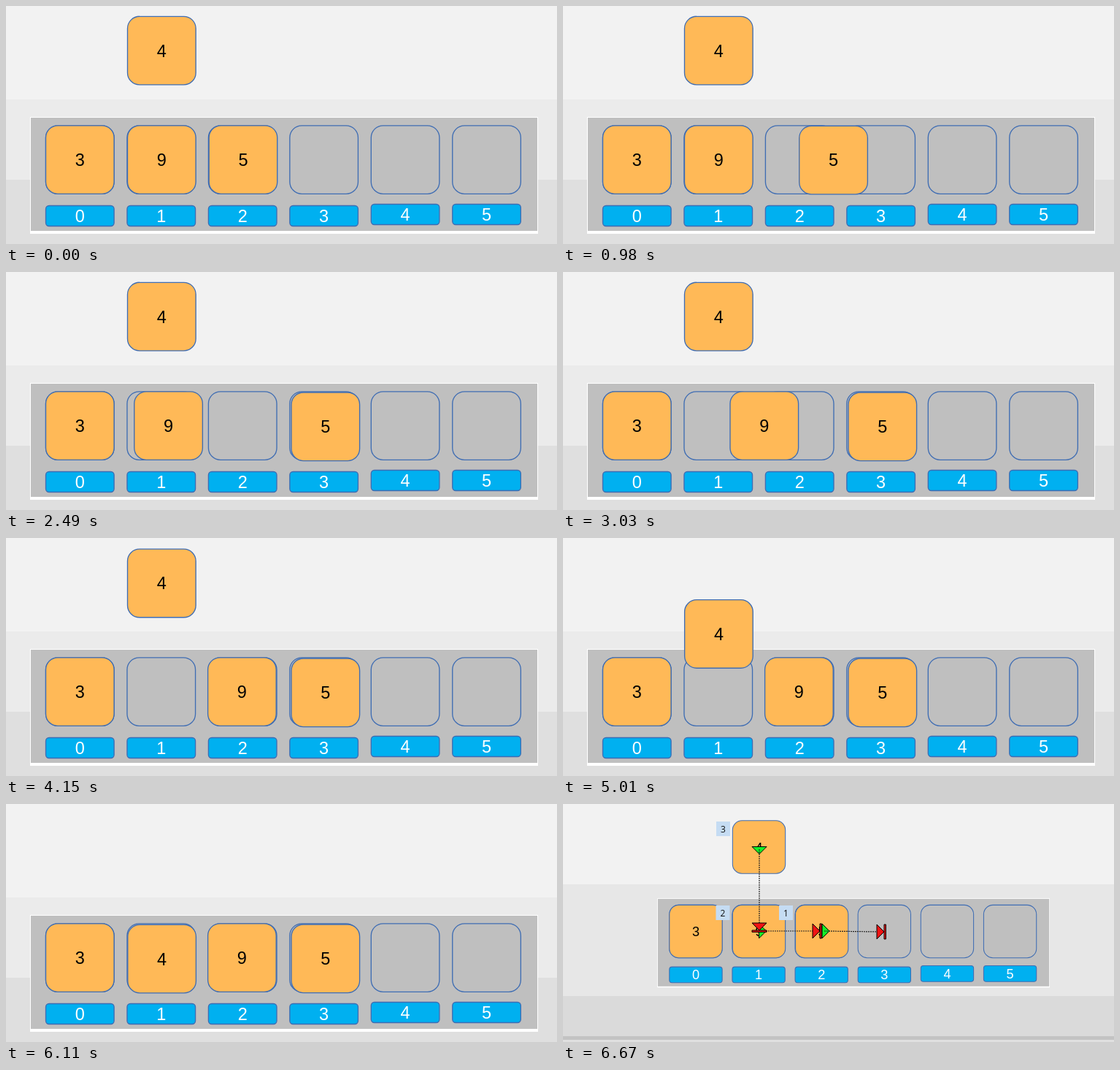
Animation, 755 px wide and 326 px high, one loop 6.77 s. Source, as an HTML page with a canvas:

```html
<!DOCTYPE html>
<html lang="en">
<head>
<meta charset="utf-8">
<title>Array insertion</title>
<style>
html, body { margin: 0; height: 100%; overflow: hidden; background: #f2f2f2; }
canvas { display: block; }
</style>
</head>
<body>
<canvas id="stage" width="755" height="326"></canvas>
<script>
const ctx = document.getElementById('stage').getContext('2d');
const LOOP = 6770, EDITOR_START = 6670, MOVE = 2000;
const SIZE = 93.6, PITCH = 111.45, LEFT = 54.5, TOP = 163.8;
const ORANGE = '#ffb957', BLUE = '#3f6db3';
const DIGITS = '23.5px "Liberation Sans", Arial, sans-serif';

const slotX = i => LEFT + PITCH * i;

// Each tile moves once, with constant acceleration and then deceleration.
const tiles = [
  { digit: 3, from: [slotX(0), TOP], to: [slotX(0), TOP], start: 0 },
  { digit: 9, from: [166.5, TOP], to: [276.6, TOP], start: 1960 },
  { digit: 5, from: [278, TOP], to: [391, 165], start: -50 },
  { digit: 4, from: [166.5, 14.3], to: [166.8, 165.3], start: 4045 }
];

// The picture is held for about 140 ms between these moments.
const anchors = [0, 150, 1130, 1250, 1830, 1950, 2220, 2370, 3030, 3160, 3310,
  3440, 3870, 4150, 4300, 5010, 5140, 5290, 6110, EDITOR_START];

function heldTime(t) {
  const i = anchors.findLastIndex(a => a <= t);
  const from = anchors[i], span = anchors[i + 1] - from;
  const step = span / Math.round(span / 140);
  return from + Math.floor((t - from) / step + 1e-6) * step;
}

function ease(u) {
  u = Math.min(1, Math.max(0, u));
  return u < 0.5 ? 2 * u * u : 1 - 2 * (1 - u) ** 2;
}

function rect(x, y, w, h, color) {
  ctx.fillStyle = color;
  ctx.fillRect(x, y, w, h);
}

function roundBox(x, y, w, h, radius, fill) {
  ctx.beginPath();
  ctx.roundRect(x, y, w, h, radius);
  if (fill) {
    ctx.fillStyle = fill;
    ctx.fill();
  }
  ctx.strokeStyle = BLUE;
  ctx.lineWidth = 1.35;
  ctx.stroke();
}

function text(value, x, baseline, color, font) {
  ctx.font = font;
  ctx.textAlign = 'center';
  ctx.fillStyle = color;
  ctx.fillText(value, x, baseline);
}

function drawArray(time, whiteBottom) {
  rect(33, 152, 696, 156 + whiteBottom, '#fff');
  rect(34, 153, 694, 155, '#bfbfbf');
  for (let i = 0; i < 6; i++) {
    const x = slotX(i), y = i < 4 ? 273.5 : 271.5;
    roundBox(x, TOP, SIZE, SIZE, 16.5);
    roundBox(x, y, SIZE, 28, 4.5, '#00b0f0');
    text(i, x + SIZE / 2, y + 22, '#fff', DIGITS);
  }
  for (const { digit, from, to, start } of tiles) {
    const p = ease((time - start) / MOVE);
    const [x, y] = from.map((a, k) => a + (to[k] - a) * p);
    roundBox(x, y, SIZE, SIZE, 16.5, ORANGE);
    text(digit, x + SIZE / 2, y + SIZE / 2 + 8.4, '#000', DIGITS);
  }
}

function drawSlide(time) {
  rect(0, 0, 755, 128, '#f2f2f2');
  rect(0, 128, 755, 110, '#ebebeb');
  rect(0, 238, 755, 88, '#dfdfdf');
  drawArray(time, 4);
}

// A triangle pointing right, or down when turned; an end marker adds a bar.
function marker(x, y, color, { down = false, bar = false } = {}) {
  ctx.save();
  ctx.translate(x, y);
  if (down) ctx.rotate(Math.PI / 2);
  ctx.beginPath();
  ctx.moveTo(0, -10);
  ctx.lineTo(10, 0);
  ctx.lineTo(0, 10);
  ctx.closePath();
  if (bar) ctx.rect(10, -10, 2.4, 20);
  ctx.fillStyle = color;
  ctx.fill();
  ctx.strokeStyle = '#000';
  ctx.lineWidth = 1;
  ctx.stroke();
  ctx.restore();
}

function dottedLine(x1, y1, x2, y2) {
  ctx.save();
  ctx.beginPath();
  ctx.moveTo(x1, y1);
  ctx.lineTo(x2, y2);
  ctx.setLineDash([2, 1]);
  ctx.strokeStyle = '#222';
  ctx.lineWidth = 1.2;
  ctx.stroke();
  ctx.restore();
}

function tag(value, x, y) {
  rect(x, y, 19, 20, '#c5dcf3');
  text(value, x + 9.5, y + 14.5, '#111', '12px "Open Sans", "Noto Sans", sans-serif');
}

function drawEditor() {
  const red = '#f01414', green = '#14f028';
  rect(0, 0, 755, 110, '#f2f2f2');
  rect(0, 110, 755, 153, '#e7e7e7');
  rect(0, 263, 755, 55, '#dadada');
  rect(0, 318, 755, 5, '#c3c3c3');
  rect(0, 323, 755, 3, '#dfdfdf');

  ctx.save();
  ctx.translate(103.7, 11.8);
  ctx.scale(0.7727, 0.7727);
  drawArray(-MOVE, 2);
  ctx.restore();

  tag(3, 210, 24);
  tag(2, 209.5, 139);
  tag(1, 296, 139);

  marker(269, 58.5, green, { down: true });
  marker(268.5, 174, green);
  marker(355, 174, green);
  dottedLine(269, 62, 269, 163);
  dottedLine(272, 174, 342, 174);
  dottedLine(358, 174, 430, 175);
  marker(269, 163, red, { down: true, bar: true });
  marker(342, 174, red, { bar: true });
  marker(430, 175, red, { bar: true });
}

function frame() {
  const t = performance.now() % LOOP;
  if (t < EDITOR_START) drawSlide(heldTime(t));
  else drawEditor();
  requestAnimationFrame(frame);
}
frame();
</script>
</body>
</html>
```
